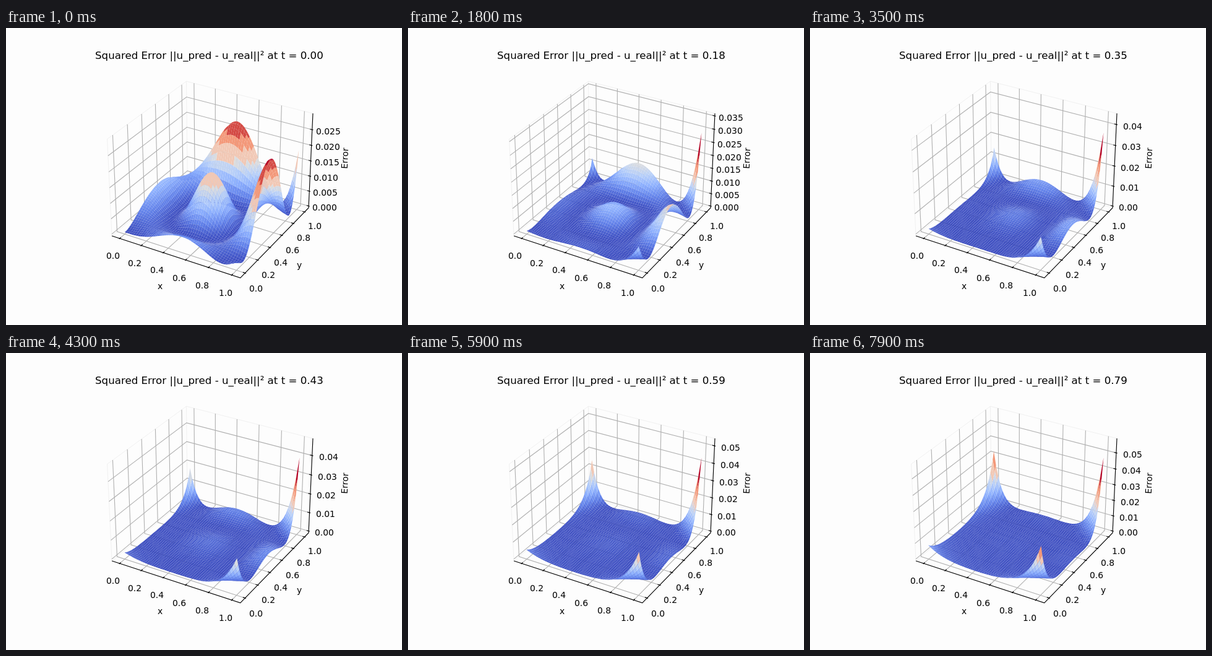
An HTML page with a canvas for the animation above (8 s loop, 640 px wide and 480 px high).

```html
<!DOCTYPE html>
<html lang="en">
<head>
<meta charset="utf-8">
<title>Squared error surface</title>
<style>
  html, body { margin: 0; width: 100%; height: 100%; overflow: hidden; background: #fdfdfd; }
  canvas { display: block; width: 640px; height: 480px; }
</style>
</head>
<body>
<canvas id="plot" width="640" height="480"></canvas>
<script>
const ctx = document.getElementById('plot').getContext('2d');
const FONT = '"DejaVu Sans", Verdana, sans-serif';
const FRAME_MS = 100, FRAMES = 80, N = 50;

// Box half sizes in view space; data spans -0.05..1.05 in x and y.
const W = 8 / 7, H = 6 / 7;
const EDGE = 0.5 + 1 / 48;
const A = EDGE * W, B = EDGE * H;
const TICK_PAD = EDGE + 0.0864, LABEL_PAD = EDGE + 0.1879;
const { exp, pow, floor, round, max, min } = Math;
const pos = s => (s - 0.5) / 1.1 * W;

// Perspective camera: elevation 30, azimuth -60, distance 10.
function project(x, y, z) {
  const depth = 10 - (0.4330 * x - 0.75 * y + 0.5 * z);
  const right = 0.8660 * x + 0.5 * y;
  const up = -0.25 * x + 0.4330 * y + 0.8660 * z;
  return [333 + 1997.8 * right / depth, 237.4 - 1997.8 * up / depth];
}

// Hump between 0 and 1 with height 1.
function hump(s, p, q) {
  const m = p / (p + q);
  return pow(s, p) * pow(1 - s, q) / (pow(m, p) * pow(1 - m, q));
}

const nearEdge = d => exp(-pow(d / 0.24, 2));
const grow = (from, by, tau, t) => from + by * (1 - exp(-t / tau));

function errorField(t) {
  const right = 0.169 * exp(-t / 0.55);
  const back = 0.163 * exp(-t / 0.55);
  const left = 0.097 * exp(-t / 0.4);
  const front = 0.08 * exp(-t / 0.35);
  const middle = 0.13 * exp(-t / 0.39);
  const c11 = grow(0.1375, 0.0955, 0.42, t);
  const c01 = grow(0.04, 0.21, 0.72, t);
  const c10 = grow(0.046, 0.16, 0.55, t);
  const c00 = 0.1 * t;
  return (x, y) => {
    const u = 1 - x, v = 1 - y;
    const r2 = (x - 0.5) ** 2 + (y - 0.5) ** 2;
    const e = middle * exp(-r2 / 0.08)
      - right * hump(y, 1.7, 1.6) * nearEdge(u)
      - back * hump(x, 1.35, 1.6) * nearEdge(v)
      - left * hump(y, 0.9, 0.7) * nearEdge(x)
      - front * hump(x, 1.7, 1.4) * nearEdge(y)
      + c11 * exp(-u / 0.16 - v / 0.14)
      + c01 * exp(-x / 0.14 - v / 0.3)
      + c10 * exp(-u / 0.25 - y / 0.17)
      + c00 * exp(-x / 0.3 - y / 0.3);
    return e * e;
  };
}

const RAMP = [
  [59, 76, 192], [98, 130, 234], [141, 176, 254], [184, 208, 249], [221, 221, 221],
  [245, 196, 173], [244, 154, 123], [222, 96, 77], [180, 4, 38]
];

// Cool half is smooth, warm half is stepped.
function colour(f) {
  if (f > 0.5) f = 0.605 + 0.15 * floor((f - 0.5) / 0.15);
  const k = min(max(f, 0), 1) * 8;
  const i = min(7, floor(k)), a = RAMP[i], b = RAMP[i + 1];
  return `rgb(${a.map((c, j) => round(c + (b[j] - c) * (k - i)))})`;
}

function line(style, width, ...points) {
  ctx.strokeStyle = style;
  ctx.lineWidth = width;
  ctx.beginPath();
  points.forEach(p => ctx.lineTo(...project(...p)));
  ctx.stroke();
}

// Centred on x, with the left edge on a whole pixel.
function text(str, x, y, size = 13.89) {
  ctx.font = `${size}px ${FONT}`;
  ctx.fillText(str, round(x - ctx.measureText(str).width / 2), round(y));
}

function tickText(str, p) {
  const [x, y] = project(...p);
  text(str, x, y + 11);
}

function drawAxes(top) {
  const step = top > 0.04 ? 0.01 : 0.005, digits = top > 0.04 ? 2 : 3;
  const zTicks = [], xyTicks = [0, 0.2, 0.4, 0.6, 0.8, 1];
  for (let i = 0; i * step <= top; i++) zTicks.push(i * step);
  const height = v => (v / top - 0.5) * H;

  // Pane outlines
  const pale = '#f1f1f1';
  line(pale, 1, [-A, -A, -B], [-A, A, -B], [-A, A, B], [-A, -A, B], [-A, -A, -B]);
  line(pale, 1, [-A, A, B], [A, A, B], [A, A, -B], [-A, A, -B]);

  const grid = '#b0b0b0', thin = 1.11;
  for (const v of xyTicks) {
    const s = pos(v);
    line(grid, thin, [s, -A, -B], [s, A, -B], [s, A, B]);
    line(grid, thin, [A, s, -B], [-A, s, -B], [-A, s, B]);
  }
  for (const v of zTicks) {
    const z = height(v);
    line(grid, thin, [-A, -A, z], [-A, A, z], [A, A, z]);
  }

  const ink = '#000';
  line(ink, thin, [-A, -A, -B], [A, -A, -B], [A, A, -B], [A, A, B]);

  const out = A + 0.1 / 12 * W, inn = A - 0.2 / 12 * W;
  const padW = TICK_PAD * W, padH = TICK_PAD * H;
  ctx.fillStyle = ink;
  for (const v of xyTicks) {
    const s = pos(v);
    line(ink, thin, [s, -out, -B], [s, -inn, -B]);
    line(ink, thin, [out, s, -B], [inn, s, -B]);
    tickText(v.toFixed(1), [s, -padW, -padH]);
    tickText(v.toFixed(1), [padW, s, -padH]);
  }
  for (const v of zTicks) {
    const z = height(v);
    line(ink, thin, [out, A, z], [inn, A, z]);
    tickText(v.toFixed(digits), [padW, padW, z]);
  }

  const farW = LABEL_PAD * W, farH = LABEL_PAD * H;
  const [xx, xy] = project(0, -farW, -farH);
  const [yx, yy] = project(farW, 0, -farH);
  text('x', xx, xy + 4);
  text('y', yx, yy + 4);
  ctx.save();
  ctx.translate(...project(farW, farW, 0));
  ctx.rotate(-87.4 * Math.PI / 180);
  text('Error', -2, 4);
  ctx.restore();
}

function drawSurface(z, top) {
  const points = z.map((row, j) => row.map((v, i) =>
    project(pos(i / N), pos(j / N), (v / top - 0.5) * H)));
  const mean = (i, j) => (z[j][i] + z[j][i + 1] + z[j + 1][i] + z[j + 1][i + 1]) / 4;
  let hi = 0, lo = 1;
  for (let j = 0; j < N; j++) {
    for (let i = 0; i < N; i++) {
      hi = max(hi, mean(i, j));
      lo = min(lo, mean(i, j));
    }
  }
  // Far cells first
  for (let j = N - 1; j >= 0; j--) {
    for (let i = 0; i < N; i++) {
      ctx.fillStyle = colour((mean(i, j) - lo) / (hi - lo));
      ctx.beginPath();
      ctx.moveTo(...points[j][i]);
      ctx.lineTo(...points[j][i + 1]);
      ctx.lineTo(...points[j + 1][i + 1]);
      ctx.lineTo(...points[j + 1][i]);
      ctx.fill();
    }
  }
}

function draw(t) {
  const field = errorField(t);
  const z = Array.from({ length: N + 1 }, (_, j) =>
    Array.from({ length: N + 1 }, (_, i) => field(i / N, j / N)));
  const top = 1.2 * max(...z.flat());
  ctx.fillStyle = '#fdfdfd';
  ctx.fillRect(0, 0, 640, 480);
  drawAxes(top);
  drawSurface(z, top);
  ctx.fillStyle = '#000';
  text(`Squared Error ||u_pred - u_real||² at t = ${t.toFixed(2)}`, 328, 50, 16.67);
}

let shown = -1;
const start = performance.now();
function tick() {
  const frame = floor((performance.now() - start) / FRAME_MS) % FRAMES;
  if (frame !== shown) {
    shown = frame;
    draw(frame / 100);
  }
  requestAnimationFrame(tick);
}
tick();
</script>
</body>
</html>
```
